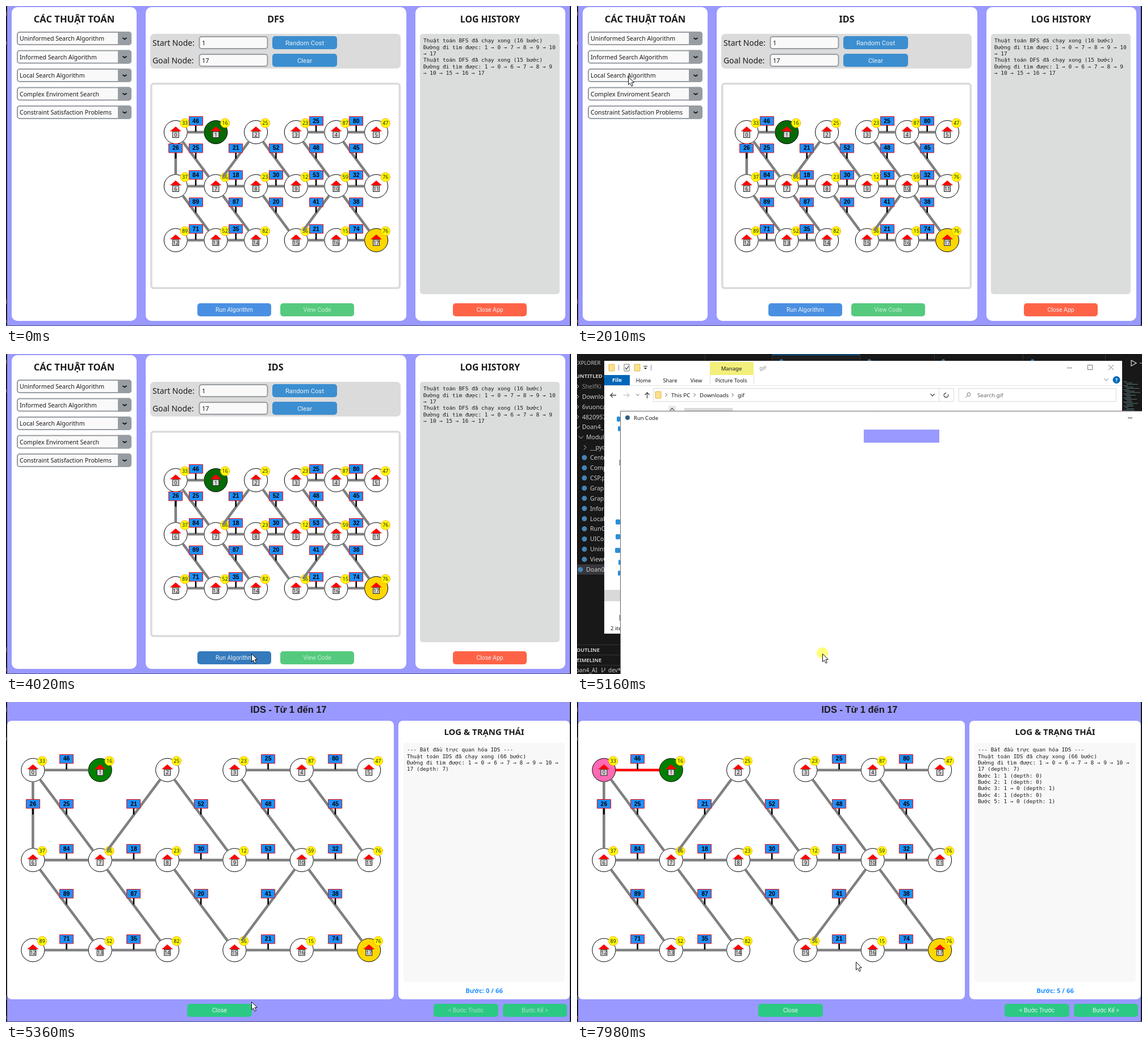
Animation, 995 px wide and 563 px high, one loop 8000 ms. Source, as an HTML page with a canvas:

```html
<!DOCTYPE html>
<html lang="vi">
<head>
<meta charset="utf-8">
<title>Search visualiser</title>
<style>
html, body { margin: 0; width: 100%; height: 100%; overflow: hidden; background: #99f; }
canvas { display: block; width: 995px; height: 563px; }
</style>
</head>
<body>
<canvas id="stage"></canvas>
<script>
const W = 995, H = 563, LOOP = 8000;
const canvas = document.getElementById('stage');
const ratio = window.devicePixelRatio || 1;
canvas.width = W * ratio;
canvas.height = H * ratio;
const c = canvas.getContext('2d');

const SANS = '"Noto Sans", sans-serif';
const ROBOTO = 'Roboto, sans-serif';
const ARIAL = '"Liberation Sans", sans-serif';
const MONO = '"DejaVu Sans Mono", monospace';
const LILAC = '#9999ff', GREY = '#979da2', INK = '#1a1a1a';

// time, x, y of the pointer tip
const POINTER = [
  [130, 893, 531], [900, 209, 57], [970, 209, 57], [1320, 172, 86], [1750, 90, 124],
  [2280, 90, 124], [2600, 482, 70], [2740, 474, 110], [2970, 411, 206], [3040, 414, 276],
  [3880, 428, 525], [3950, 428, 525], [4020, 432, 527], [5760, 432, 527],
  [6030, 489, 466], [6240, 491, 457]
];
const CLICKS = [[970, 1040], [1880, 1950], [5160, 5230]];

const HEURISTICS = [33, 16, 25, 23, 87, 47, 37, 86, 23, 12, 59, 76, 89, 52, 82, 36, 15, 76];
const EDGES = ('0-1-46 0-6-26 0-7-25 2-7-21 2-9-52 3-4-25 4-5-80 3-10-48 4-11-45 6-7-84 7-8-18 8-9-30 ' +
  '9-10-53 10-11-32 6-13-89 7-14-87 8-15-20 10-15-41 10-17-38 12-13-71 13-14-35 15-16-21 16-17-74')
  .split(' ').map(e => e.split('-').map(Number));

const MAIN_LOG = [
  'Thuật toán BFS đã chạy xong (16 bước)',
  'Đường đi tìm được: 1 → 0 → 7 → 8 → 9 → 10', '→ 17',
  'Thuật toán DFS đã chạy xong (15 bước)',
  'Đường đi tìm được: 1 → 0 → 6 → 7 → 8 → 9', '→ 10 → 15 → 16 → 17'
];
const RUN_LOG = ['--- Bắt đầu trực quan hóa IDS ---', 'Thuật toán IDS đã chạy xong (66 bước)'];
const PATH_NARROW = ['Đường đi tìm được: 1 → 0 → 6 → 7 → 8 → 9 →', '10 → 17 (depth: 7)'];
const PATH_WIDE = ['Đường đi tìm được: 1 → 0 → 6 → 7 → 8 → 9 → 10 →', '17 (depth: 7)'];
const STEPS = [
  [5910, '1 (depth: 0)'], [6440, '1 (depth: 0)'], [6970, '1 → 0 (depth: 1)'],
  [7450, '1 (depth: 0)'], [7980, '1 → 0 (depth: 1)']
];

function rect(x, y, w, h, fill) {
  c.fillStyle = fill;
  c.fillRect(x, y, w, h);
}
function box(x, y, w, h, r, fill, stroke, line = 1) {
  c.beginPath();
  c.roundRect(x, y, w, h, r);
  c.fillStyle = fill;
  c.fill();
  if (stroke) { c.strokeStyle = stroke; c.lineWidth = line; c.stroke(); }
}
function disc(x, y, r, fill, stroke) {
  c.beginPath();
  c.arc(x, y, r, 0, Math.PI * 2);
  c.fillStyle = fill;
  c.fill();
  if (stroke) { c.strokeStyle = stroke; c.lineWidth = 1; c.stroke(); }
}
function path(points, stroke, width = 1, fill) {
  c.beginPath();
  points.forEach(([x, y]) => c.lineTo(x, y));
  if (fill) { c.closePath(); c.fillStyle = fill; c.fill(); }
  if (stroke) { c.strokeStyle = stroke; c.lineWidth = width; c.stroke(); }
}
// y is the middle of the capitals
function text(s, x, y, size, { font = SANS, fill = INK, bold = false, align = 'left' } = {}) {
  c.font = `${bold ? 'bold ' : ''}${size}px ${font}`;
  c.fillStyle = fill;
  c.textAlign = align;
  c.fillText(s, x, y + size * 0.36);
}
const heading = (s, x, y, size = 16.1) => text(s, x, y, size, { bold: true, align: 'center' });
const logLines = (lines, x, y) =>
  lines.forEach((s, i) => text(s, x, y + i * 11.35, 9.43, { font: MONO }));

function button(label, x, y, w, fill, size = 10.4, ink = '#eef2f6') {
  box(x, y, w, 23, 5, fill);
  text(label, x + w / 2, y + 11.5, size, { font: ROBOTO, fill: ink, align: 'center' });
}
function chevron(x, y, dx, dy, color, width = 1) {
  path([[x - dx, y - dy], [x + (dx > dy ? 0 : dx), y + (dx > dy ? dy : 0)],
    [x + (dx > dy ? dx : -dx), y + (dx > dy ? -dy : dy)]], color, width);
}

function pointerAt(t) {
  const i = POINTER.findIndex(p => p[0] > t);
  if (i < 0) return POINTER[POINTER.length - 1].slice(1);
  if (i === 0) return null;
  const [t0, x0, y0] = POINTER[i - 1], [t1, x1, y1] = POINTER[i];
  const k = (t - t0) / (t1 - t0);
  return [x0 + (x1 - x0) * k, y0 + (y1 - y0) * k];
}
function drawPointer(t) {
  const p = pointerAt(t);
  if (!p) return;
  const [x, y] = p.map(Math.round);
  if (CLICKS.some(([a, b]) => t >= a && t < b)) disc(x, y - 1, 10, 'rgba(255,255,90,.8)');
  const shape = [[0, 0], [0, 14], [3, 11], [5.5, 16.5], [8, 15.3], [5.6, 10.2], [9.8, 10]];
  path([...shape, shape[0]].map(([a, b]) => [x + a + .5, y + b + .5]), '#111', 1, '#fff');
}

function drawGraph(x0, y0, dx, dy, green, active) {
  const at = i => [x0 + (i % 6) * dx, y0 + Math.floor(i / 6) * dy];
  HEURISTICS.forEach((h, i) => {
    const [x, y] = at(i);
    const fill = i === 1 ? green : i === 17 ? '#ffd700' : i === 0 && active ? '#ff69b4' : '#fff';
    disc(x, y, 20.5, fill, '#000');
    path([[x, y - 10], [x - 10, y - 1.5], [x + 10, y - 1.5]], null, 0, '#f00');
    c.strokeStyle = '#222';
    c.lineWidth = 1;
    rect(x - 5.5, y - 1, 11, 10.5, '#d8d8d8');
    c.strokeRect(x - 5.5, y - 1, 11, 10.5);
    text(i, x, y + 4.3, 9, { align: 'center' });
    disc(x + 16.3, y - 16, 8, '#ff0', '#ffa500');
    text(h, x + 16.3, y - 16, 9, { align: 'center' });
  });
  EDGES.forEach(([a, b, cost], i) => {
    const [ax, ay] = at(a), [bx, by] = at(b);
    const d = Math.hypot(bx - ax, by - ay), ux = (bx - ax) / d * 20.5, uy = (by - ay) / d * 20.5;
    path([[ax + ux, ay + uy], [bx - ux, by - uy]], active && i === 0 ? '#f00' : '#808080', 4.6);
    const mx = (ax + bx) / 2, my = (ay + by) / 2;
    path([[mx, my - 13], [mx, my - 1]], '#000', 2.6);
    box(Math.round(mx - 12.5) + .5, Math.round(my - 28) + .5, 24, 15.5, 0, '#1e90ff', '#f00');
    text(cost, mx, my - 20, 10.4, { font: ARIAL, bold: true, align: 'center', fill: '#000' });
  });
}

function windowEdges() {
  rect(0, 0, 2, H, '#15151f');
  rect(993, 0, 2, H, '#15151f');
  rect(0, 562, W, 1, '#50508a');
  [[10, 7], [62, 6], [516, 8], [552, 6]].forEach(([y, h]) => rect(0, y, 1, h, '#9a6a55'));
}

function drawMain(t) {
  const [px, py] = pointerAt(t) || [-9, -9];
  const over = (x, y, w, h) => px >= x && px <= x + w && py >= y && py <= y + h;
  const hover = (x, y, w, base, hot) => over(x, y, w, 23) ? hot : base;

  rect(0, 0, W, H, LILAC);
  windowEdges();
  [[10, 220], [246, 459], [721, 264]].forEach(([x, w]) => box(x, 2, w, 552, 10, '#fff'));
  heading('CÁC THUẬT TOÁN', 120, 23, 16.6);
  heading(t < 1950 ? 'DFS' : 'IDS', 475, 23);
  heading('LOG HISTORY', 852.5, 23, 15.8);

  ['Uninformed Search Algorithm', 'Informed Search Algorithm', 'Local Search Algorithm',
    'Complex Enviroment Search', 'Constraint Satisfaction Problems'].forEach((label, i) => {
    const y = 45 + i * 32.5;
    box(20, y + 1, 200, 22, 4, '#f9f9fa', GREY, 2);
    const hot = over(197, y, 24, 24) && t >= 800;
    box(197, y, 24, 24, [0, 5, 5, 0], hot ? '#6e7174' : GREY);
    path([[205.5, y + 11], [209, y + 13.5], [212.5, y + 11]], '#111', 1.8);
    text(label, 24, y + 12.2, 10.6);
  });

  box(254, 49, 441, 61, 7, '#dbdbdb');
  [['Start Node:', '1', 53], ['Goal Node:', '17', 84]].forEach(([label, value, y]) => {
    text(label, 258, y + 11.7, 13.9);
    box(340.5, y + 1, 120, 21, 4, '#f9f9fa', GREY, 2);
    text(value, 345, y + 11.7, 11);
  });
  button('Random Cost', 469, 53, 114, hover(469, 53, 114, '#3b8ed0', '#36719f'), 11.3);
  button('Clear', 469, 84, 114, hover(469, 84, 114, '#3b8ed0', '#36719f'), 11.3);

  box(255.8, 136.8, 437.5, 359.5, 4, '#fff', '#dbdbdb', 3.6);
  drawGraph(298.8, 222, 70.65, 95, '#056905', false);
  box(729, 49, 246, 458, 5, '#dbdddc');
  logLines(MAIN_LOG, 735, 61);

  button('Run Algorithm', 337, 523, 130, hover(337, 523, 130, '#4a90e2', '#357abd'));
  button('View Code', 483, 523, 130, '#55ca7e', 10.4, '#c4efd2');
  button('Close App', 787, 523, 130, hover(787, 523, 130, '#ff6347', '#e5533d'));

  if (t >= 970 && t < 1950) {
    box(19.5, 72.5, 108, 69, 0, '#e6e6e6', '#a8a8a8');
    ['BFS', 'DFS', 'IDS'].forEach((s, i) => {
      const y = 85.5 + i * 22;
      if (over(20, y - 11, 107, 22)) rect(21, y - 11, 105, 22, '#c8c8c8');
      text(s, 38, y, 10.2);
    });
  }
}

function drawEditor() {
  rect(0, 0, W, H, '#181818');
  rect(343, 0, 155, 30, '#1f1f1f');
  rect(343, 1, 155, 1, '#0078d4');
  [225, 343, 498, 629, 785, 930].forEach(x => rect(x, 0, 1, 13, '#333'));
  [360, 515, 645, 802].forEach(x => disc(x, 12, 3, '#3a6d94'));
  path([[976, 11], [976, 21], [985, 16], [976, 11]], '#ddd', 1.2);
  path([[991, 15], [993, 17], [995, 15]], '#bbb');
  for (let i = 0; i < 22; i++) {
    rect(962 + (i % 3) * 3, 48 + i * 2.4, 6 + (i * 7) % 19, 1, i % 2 ? '#607080' : '#4a7a70');
  }
  const pale = { fill: '#ccc' };
  text('EXPLORER', -4, 16, 9.4, pale);
  text('UNTITLED (', -2, 39, 9.4, { ...pale, bold: true });
  rect(0, 370, 48, 18, '#37373d');
  ['ShelfKi', 'Downloa', '6vuonca', '4820957', 'Doan4_', 'Module', '__pyc', 'Cente', 'Comp', 'CSP.p',
    'Graph', 'Graph', 'Inform', 'LocalS', 'RunC', 'UICon', 'Uninf', 'ViewC', 'Doan0'].forEach((s, i) => {
    const y = 57 + i * 17.9, last = i === 18;
    if (i > 6) disc(last ? 6 : 13, y, 4.5, '#4584b6');
    else if (i === 4 || i === 5) chevron(i === 4 ? 1 : 7, y, 4, 2, '#ccc');
    else chevron(i === 6 ? 14 : 1, y, 2, 4, '#ccc');
    text(s, i < 5 ? 9 : last || i === 5 ? 16 : 23, y, 10.6, i ? pale : { fill: '#8a8a8a' });
  });
  [511, 529, 547].forEach(y => rect(0, y, 76, 1, '#333'));
  text('OUTLINE', -1, 521, 9.2, { ...pale, bold: true });
  text('TIMELINE', -1, 538.5, 9.2, { ...pale, bold: true });
  text('oan4_AI', -2, 556, 10, pale);
  path([[44, 552], [44, 560], [49, 556], [49, 552]], '#ccc');
  text('dev*', 55, 556, 10, pale);
}

function folder(x, y) {
  box(x, y, 10, 12, 1, '#ffe08a', '#dcb44c');
}

function drawFolderWindow() {
  rect(48, 12, 912, 480, '#fff');
  folder(56, 18);
  folder(101, 18);
  box(83, 18, 9, 12, 0, '#fff', '#777');
  path([[85, 24], [87, 27], [91, 21]], '#444', 1.3);
  rect(73, 19, 1, 10, '#888');
  rect(130, 19, 1, 10, '#888');
  path([[118, 24], [123, 24], [120.5, 27]], null, 0, '#222');
  rect(117, 21, 7, 1, '#222');
  rect(234, 14, 77, 23, '#f3ef7c');
  rect(234, 37, 1, 15, '#ddd');
  rect(311, 37, 1, 15, '#ddd');
  rect(48, 37, 45, 18, '#0067b8');
  const mid = { align: 'center' };
  text('Manage', 272, 26, 9.6, mid);
  text('gif', 327, 25, 9.6, { ...mid, fill: '#888' });
  text('File', 70.5, 46, 9.6, { ...mid, fill: '#fff', bold: true });
  [['Home', 117], ['Share', 164], ['View', 210], ['Picture Tools', 271.5]]
    .forEach(([s, x]) => text(s, x, 46.5, 9.4, mid));
  rect(863, 24, 9, 1, '#777');
  c.strokeStyle = '#777';
  c.lineWidth = 1;
  c.strokeRect(899.5, 19.5, 8, 8);
  path([[936, 19], [945, 28]], '#777');
  path([[945, 19], [936, 28]], '#777');
  chevron(932, 45, 3.5, 2, '#777');
  disc(950, 45.5, 6.5, '#0067b8');
  text('?', 950, 45.5, 9.5, { ...mid, fill: '#fff', bold: true });
  rect(48, 55, 912, 1, '#e3e3e3');
  path([[69, 72.5], [59, 72.5], [63, 68.5], [59, 72.5], [63, 76.5]], '#444', 1.3);
  path([[82, 72.5], [92, 72.5], [88, 68.5], [92, 72.5], [88, 76.5]], '#ccc', 1.3);
  chevron(107, 72, 2.5, 1.5, '#666');
  path([[123.5, 78], [123.5, 68], [119.5, 72], [123.5, 68], [127.5, 72]], '#444', 1.3);
  box(134.5, 60.5, 529, 23, 0, '#fff', '#d9d9d9');
  rect(637, 61, 1, 23, '#d9d9d9');
  box(672.5, 60.5, 277, 23, 0, '#fff', '#d9d9d9');
  folder(138, 66);
  [157, 207, 274].forEach(x => chevron(x, 72, 1.5, 3, '#555'));
  text('This PC', 166, 72, 9.8);
  text('Downloads', 216, 72, 9.8);
  text('gif', 283, 72, 9.8);
  chevron(626, 72, 3.5, 2, '#555', 1.4);
  c.beginPath();
  c.arc(650, 72.5, 3.8, -0.4, 4.8);
  c.stroke();
  disc(690, 71, 3, '#fff', '#777');
  path([[688, 73], [684, 77]], '#777');
  text('Search gif', 705, 72, 9.8, { fill: '#666' });
  rect(161, 91, 13, 9, '#e9e9e9');
  path([[164, 99], [167.5, 95.5], [171, 99]], '#555', 1.4);
  rect(189, 95, 85, 5, '#d9d9d9');
  rect(48, 415, 28, 20, '#d9d9d9');
  [[70, 110], [72, 127], [68, 291], [68, 317], [67, 341], [73, 362], [72, 381]]
    .forEach(([x, y]) => box(x, y, 76 - x, 9, 2, '#2b8fd9'));
  rect(74, 186, 2, 10, '#aaa');
  rect(74, 459, 2, 10, '#aaa');
  text('2 items', 59, 483, 9.6);
}

function drawOpening() {
  drawEditor();
  drawFolderWindow();
  rect(76, 100, 919, 463, '#fff');
  path([[76.5, 563], [76.5, 100.5], [995, 100.5]], '#666');
  disc(89, 112, 4, '#2d5f8a');
  text('Run Code', 100, 112.5, 9.5);
  rect(970, 112, 8, 1, '#333');
  rect(505, 133, 133, 23, LILAC);
}

const runTitle = () =>
  text('IDS - Từ 1 đến 17', 497.5, 13, 16.4, { font: ARIAL, bold: true, align: 'center' });
const runGraph = (y, active) => drawGraph(47.4, y, 118.35, 158.4, '#008000', active);

function drawPartial() {
  rect(0, 0, W, H, '#fff');
  windowEdges();
  rect(985, 0, 10, 33, '#111');
  rect(431, 2, 133, 22, LILAC);
  runTitle();
  path([[678, 33], [696, 33], [691, 40], [691, 532], [696, 540], [678, 540], [683, 532], [683, 40]], null, 0, LILAC);
  path([[2, 33], [8, 33], [2, 39]], null, 0, LILAC);
  path([[2, 540], [8, 540], [2, 534]], null, 0, LILAC);
  path([[993, 532], [993, 540], [986, 540]], null, 0, LILAC);
  runGraph(139, false);
  c.save();
  c.beginPath();
  c.rect(780, 40, 132, 26);
  c.clip();
  text('LOG & TRẠNG THÁI', 786, 53, 14.8, { bold: true });
  c.restore();
  rect(700, 72, 256, 436, '#f8f8f8');
  logLines([...RUN_LOG, ...PATH_NARROW], 706, 84);
  [[712, 8], [753, 114], [875, 113]].forEach(([x, w]) => rect(x, 540, w, 22, LILAC));
  rect(907, 544, 49, 13, '#2cc985');
  text('Bước Kế >', 931.5, 550.5, 10.4, { font: ROBOTO, fill: '#bfe6d4', align: 'center' });
}

function drawRun(t) {
  const done = STEPS.filter(s => t >= s[0]);
  const n = done.length, dim = '#b4dccb';
  rect(0, 0, W, H, LILAC);
  windowEdges();
  runTitle();
  box(2, 33, 681, 490, 8, '#fff');
  box(691, 33, 302, 490, 8, '#fff');
  runGraph(119.7, n === 3 || n === 5);
  heading('LOG & TRẠNG THÁI', 842, 53, 14.9);
  box(700, 72, 284, 420, 4, '#f8f8f8');
  logLines([...RUN_LOG, ...PATH_WIDE, ...done.map((s, i) => `Bước ${i + 1}: ${s[1]}`)], 706, 84);
  text(`Bước: ${n} / 66`, 842, 508, 11.3, { bold: true, fill: '#1e90ff', align: 'center' });
  button('Close', 319, 531, 114, '#2cc985');
  button('< Bước Trước', 753, 531, 114, '#2cc985', 10.4, n > 1 ? '#eef2f6' : dim);
  button('Bước Kế >', 875, 531, 113, '#2cc985', 10.4, n ? '#eef2f6' : dim);
}

function draw(t) {
  c.setTransform(ratio, 0, 0, ratio, 0, 0);
  if (t < 5160) drawMain(t);
  else if (t < 5285) drawOpening();
  else if (t < 5360) drawPartial();
  else drawRun(t);
  drawPointer(t);
}

const start = performance.now();
function tick() {
  draw((performance.now() - start) % LOOP);
  requestAnimationFrame(tick);
}
tick();
</script>
</body>
</html>
```
